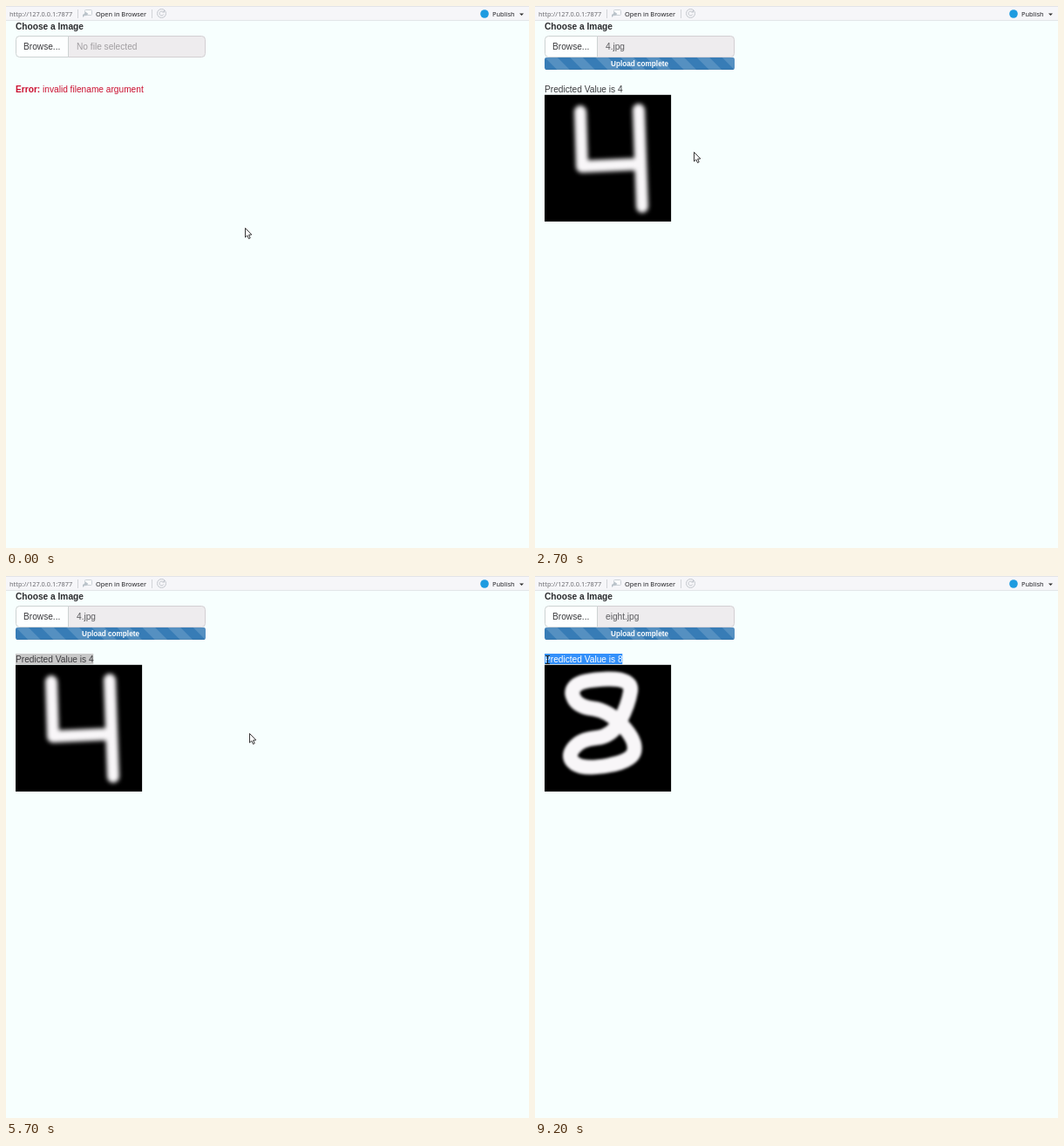
Animation, 600 px wide and 621 px high, one loop 9.3 s. Source, as an HTML page with a canvas:

```html
<!DOCTYPE html>
<html lang="en">
<head>
<meta charset="utf-8">
<title>Digit prediction</title>
<style>
  html, body { margin: 0; width: 100%; height: 100%; overflow: hidden; background: #f7fffe; }
  canvas { display: block; }
</style>
</head>
<body>
<canvas id="stage" width="600" height="621"></canvas>
<script>
const ctx = document.getElementById('stage').getContext('2d');
const LOOP = 9300, STEP = 100;
const ZOOM = 218 / 300;             // page zoom: a 300px wide form shown at 218px
const LEFT = 11, FORM = 300 * ZOOM, PHOTO = 200 * ZOOM, PHOTO_TOP = 101.6;
const SANS = '"Liberation Sans", Arial, sans-serif';
const UI = '"Noto Sans", "Open Sans", sans-serif';
const BODY = `${14 * ZOOM}px ${SANS}`, BOLD = `bold ${14 * ZOOM}px ${SANS}`;
const INK = '#3b3b3e', LINE = { top: 89, base: 98.5, height: 12, end: 100.5 };

// Each glide has a start time, an end time and the place it reaches.
const LINE_END = [102, 95], LINE_START = [14, 96];
const REST = [274, 254];
const GLIDES = [
  [0, 100, [345, 280]],
  [200, 400, [464, 165]],
  [400, 700, [477, 345]],
  [700, 1300, [488, 374]],
  [2500, 2700, [182, 167]],
  [2700, 3100, [180, 92]],
  [3400, 3600, LINE_END],
  [3600, 4200, LINE_START],
  [4300, 4800, [33, 62]],
  [5000, 5300, [40, 44]],
  [5400, 6000, [517, 315]],
  [6400, 6700, [476, 254]],
  [6700, 7000, [461, 358]],
  [7400, 7900, [89, 83]],
  [8100, 8500, LINE_END],
  [8500, 9200, LINE_START]
];
const UPLOADS = [
  { start: 1400, done: 2200, drag: 3600, file: '4.jpg', digit: '4' },
  { start: 7000, done: 7400, drag: 8500, file: 'eight.jpg', digit: '8' }
];
const DIALOG = 5400;                // opening the file dialog greys the selection

const between = (a, b, k) => a + (b - a) * k;

function pointerAt(t) {
  let [x, y] = REST;
  for (const [start, end, to] of GLIDES) {
    const k = Math.min(1, Math.max(0, (t - start) / (end - start)));
    x = between(x, to[0], k);
    y = between(y, to[1], k);
  }
  return { x: Math.round(x), y: Math.round(y) };
}

// Cubic Bezier (.25, .1, .25, 1)
function ease(p) {
  if (p >= 1) return 1;
  const curve = (u, a, b) => 3 * u * (1 - u) ** 2 * a + 3 * u * u * (1 - u) * b + u ** 3;
  let lo = 0, hi = 1;
  for (let i = 0; i < 20; i++) {
    const mid = (lo + hi) / 2;
    if (curve(mid, .25, .25) < p) lo = mid; else hi = mid;
  }
  return curve(lo, .1, 1);
}

function text(str, x, y, font, color, align = 'left') {
  ctx.font = font;
  ctx.fillStyle = color;
  ctx.textAlign = align;
  ctx.fillText(str, x, y);
}

function rect(x, y, w, h, color) {
  ctx.fillStyle = color;
  ctx.fillRect(x, y, w, h);
}

function box(x, y, w, h, radii, fill, stroke) {
  ctx.beginPath();
  ctx.roundRect(x, y, w, h, radii);
  ctx.fillStyle = fill;
  ctx.fill();
  if (stroke) {
    ctx.strokeStyle = stroke;
    ctx.lineWidth = 1;
    ctx.stroke();
  }
}

function poly(points, fill) {
  ctx.beginPath();
  for (let i = 0; i < points.length; i += 2) ctx.lineTo(points[i], points[i + 1]);
  ctx.closePath();
  ctx.fillStyle = fill;
  ctx.fill();
}

function arc(x, y, r, from = 0, to = 7) {
  ctx.beginPath();
  ctx.arc(x, y, r, from, to);
}

function clipRect(x, y, w, h, paint) {
  ctx.save();
  ctx.beginPath();
  ctx.rect(x, y, w, h);
  ctx.clip();
  paint();
  ctx.restore();
}

function toolbar() {
  rect(0, 0, 600, 16, '#f6f6f9');
  rect(0, 0, 600, 1, '#e3e4e8');
  rect(0, 16, 600, 1, '#e2e5e8');
  const font = `7.4px ${UI}`;
  text('http://127.0.0.1:7877', 4, 11.8, font, '#6b6b70');
  text('Open in Browser', 103, 12, font, '#222226');
  text('Publish', 558, 12, font, '#222226');
  for (const x of [82, 167]) rect(x, 4, 1, 10, '#d2d4d8');
  box(90.5, 4.5, 8, 6, 1, '#fbfcfd', '#cbd1d6');
  poly([88, 13, 88, 10, 91, 8, 91, 6.5, 94.5, 9, 91, 11.5, 91, 10.5], '#bac3ca');
  ctx.strokeStyle = '#c3c7cd';
  ctx.lineWidth = 1;
  arc(178.5, 8.5, 5);
  ctx.stroke();
  arc(178.5, 8.5, 2.5, .4, 5.3);
  ctx.stroke();
  poly([179, 7.5, 182, 7.5, 182, 4.5], '#c3c7cd');
  arc(549, 9, 4.8);
  ctx.fillStyle = '#1e9be0';
  ctx.fill();
  poly([589, 8.5, 594, 8.5, 591.5, 11], '#333');
}

function fileInput(upload) {
  text('Choose a Image', LEFT, 27, BOLD, '#2b2b2e');
  box(71.5, 34.5, 157, 24, [0, 4, 4, 0], '#eeecee', '#d3cfd2');
  box(11.5, 34.5, 60, 24, [4, 0, 0, 4], '#fdffff', '#cdd2d2');
  text('Browse...', 20, 49.5, BODY, INK);
  text(upload ? upload.file : 'No file selected', 81, 49.5, BODY, upload ? '#5c5c5f' : '#a09da0');
}

function progress(k) {
  const y = 58.7, w = FORM * k, h = 20 * ZOOM, tile = 40 * ZOOM;
  box(LEFT, y, FORM, h, 3, '#f3f2f5');
  ctx.save();
  ctx.beginPath();
  ctx.roundRect(LEFT, y, FORM, h, 3);
  ctx.clip();
  clipRect(LEFT, y, w, h, () => {
    rect(LEFT, y, w, h, '#377cb6');
    for (let s = LEFT - tile; s < LEFT + w; s += tile) {
      poly([s, y, s + tile / 2, y, s + tile / 2 + h, y + h, s + h, y + h], 'rgba(255,255,255,.15)');
    }
    rect(LEFT, y + h - ZOOM, w, ZOOM, 'rgba(0,0,0,.15)');
    text('Upload complete', LEFT + w / 2, 69, `bold 8.2px ${SANS}`, '#fff', 'center');
  });
  ctx.restore();
}

// Closed curve that touches the middle of every side of a polygon.
function softLoop(points) {
  const n = points.length;
  const mid = i => [0, 1].map(a => (points[i % n][a] + points[(i + 1) % n][a]) / 2);
  ctx.moveTo(...mid(0));
  for (let i = 1; i <= n; i++) ctx.quadraticCurveTo(...points[i % n], ...mid(i));
}

const GLYPHS = {
  4: { width: 14, blur: 2.5, trace() {
    ctx.moveTo(52, 121);
    ctx.lineTo(54, 184);
    ctx.lineTo(121, 181);
    ctx.moveTo(119, 119);
    ctx.lineTo(123, 230);
  } },
  8: { width: 17, blur: 1.5, trace() {
    softLoop([
      [112, 117], [107, 148], [88, 184], [52, 187], [36, 208], [56, 222],
      [112, 212], [116, 188], [84, 154], [50, 150], [40, 132], [54, 119]
    ]);
  } }
};

function digitImage(digit) {
  const { width, blur, trace } = GLYPHS[digit];
  clipRect(LEFT, PHOTO_TOP, PHOTO, PHOTO, () => {
    rect(LEFT, PHOTO_TOP, PHOTO, PHOTO, '#000');
    ctx.filter = `blur(${blur}px)`;
    ctx.strokeStyle = '#f8f6f8';
    ctx.lineWidth = width;
    ctx.lineCap = ctx.lineJoin = 'round';
    ctx.beginPath();
    trace();
    ctx.stroke();
  });
}

function prediction(t, { digit, drag }, x) {
  const label = 'Predicted Value is ' + digit;
  text(label, LEFT, LINE.base, BODY, INK);
  if (t > drag) {
    const grey = t >= DIALOG && digit === '4';
    const reached = t > drag + 600 || x < 20;
    const left = reached ? LEFT : Math.min(x, LINE.end);
    clipRect(left, LINE.top, LINE.end - left, LINE.height, () => {
      rect(left, LINE.top, LINE.end - left, LINE.height, grey ? '#c8c8c8' : '#3390fa');
      text(label, LEFT, LINE.base, BODY, grey ? INK : '#fff');
    });
  }
  digitImage(digit);
}

function pointer(x, y, beam) {
  ctx.save();
  ctx.translate(x, y);
  if (beam) {
    rect(0, -5, 1, 10, '#222');
    for (const end of [-5, 4]) rect(-2, end, 5, 1, '#222');
  } else {
    poly([.5, .5, .5, 11, 2.8, 8.9, 4.5, 12.6, 6.2, 11.8, 4.6, 8.2, 7.8, 8], '#fff');
    ctx.strokeStyle = '#222';
    ctx.lineWidth = .9;
    ctx.stroke();
  }
  ctx.restore();
}

function draw(t) {
  const { x, y } = pointerAt(t);
  const upload = UPLOADS.filter(u => t > u.start).pop();
  const result = UPLOADS.filter(u => t >= u.done).pop();
  rect(0, 0, 600, 621, '#f7fffe');
  toolbar();
  fileInput(upload);
  if (upload) progress(ease((t - upload.start) / 600));
  if (result) {
    prediction(t, result, x);
  } else {
    text('Error:', LEFT, LINE.base, BOLD, '#cc1030');
    text('invalid filename argument', 42, LINE.base, BODY, '#cc1030');
  }
  pointer(x, y, result && x < 108 && y >= LINE.top && y < PHOTO_TOP);
}

const begin = performance.now();
function tick() {
  const t = (performance.now() - begin) % LOOP;
  draw(Math.floor(t / STEP) * STEP);
  requestAnimationFrame(tick);
}
tick();
</script>
</body>
</html>
```
